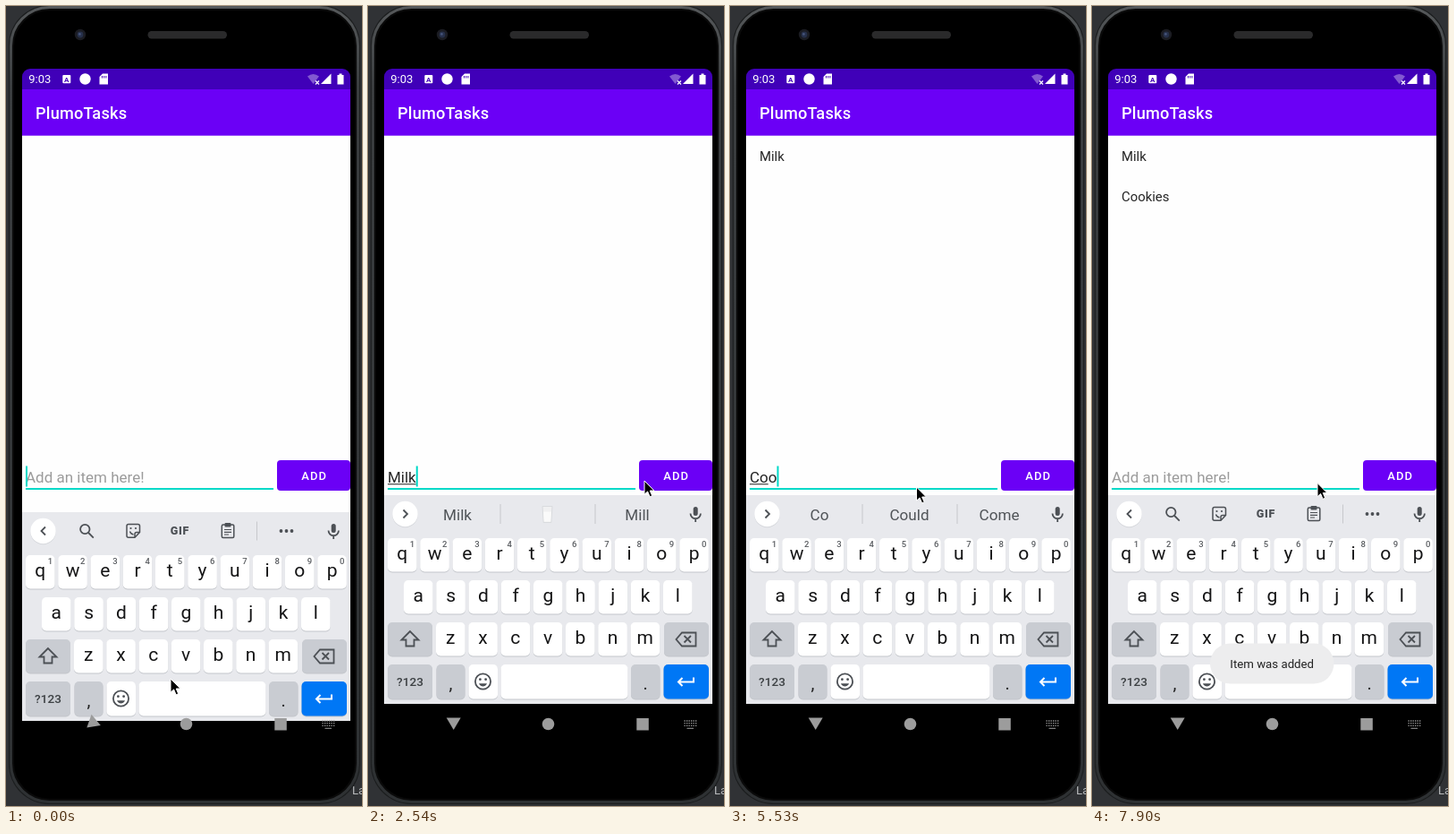
Recreate the animation shown at these times as an HTML page. Size 398 px wide and 893 px high, loop 8 s.

```html
<!DOCTYPE html>
<html lang="en">
<head>
<meta charset="utf-8">
<title>To-do list</title>
<style>
html, body { margin: 0; width: 100%; height: 100%; overflow: hidden; background: #303235; }
svg { display: block; width: 100vw; height: 100vh; }
text { font-family: Roboto, sans-serif; white-space: pre; }
.mid { text-anchor: middle; }
.med { font-weight: 500; }
.line { fill: none; stroke: #4c5055; stroke-width: 1.8; }
</style>
</head>
<body>
<svg id="stage" viewBox="0 0 398 893" preserveAspectRatio="none"></svg>
<script>
const LOOP = 8000;
const stage = document.getElementById('stage');

const rect = (x, y, w, h, fill, r = 0, more = '') =>
  `<rect x="${x}" y="${y}" width="${w}" height="${h}" rx="${r}" fill="${fill}" ${more}/>`;
const circle = (x, y, r, fill, more = '') =>
  `<circle cx="${x}" cy="${y}" r="${r}" fill="${fill}" ${more}/>`;
const path = (d, more = 'class="line"') => `<path d="${d}" ${more}/>`;
const text = (x, y, size, fill, str, more = '') =>
  `<text x="${x}" y="${y}" font-size="${size}" fill="${fill}" ${more}>${str}</text>`;

function phone() {
  return '<linearGradient id="rim" x2="0" y2="1"><stop stop-color="#55585a"/>' +
    '<stop offset=".1" stop-color="#3a3d3f"/><stop offset="1" stop-color="#2e3133"/></linearGradient>' +
    rect(0, 0, 398, 893, '#303235') +
    text(387, 880, 13, '#b9bbbd', 'La') +
    rect(3, -1, 393, 892, '#1b1d1e', 45) +
    rect(5.5, 1.5, 388, 887, '#0a0a0a', 43, 'stroke="url(#rim)" stroke-width="3"') +
    rect(9, 5, 381, 880, '#000', 40) +
    rect(158.5, 28, 88.5, 8.5, '#2a2a2b', 4.2) +
    circle(83, 32, 6.2, '#1b1c22') + circle(83, 32, 3.4, '#26304a') + circle(82.4, 31.4, 1.3, '#47557c');
}

function statusBar() {
  return path('M18 93V79a9 9 0 0 1 9-9H376a9 9 0 0 1 9 9V93Z', 'fill="#4000b8"') +
    rect(18, 93, 367, 51.7, '#6b00f6') +
    text(25.3, 86.3, 13, '#fff', '9:03') +
    rect(63.3, 77, 9, 9.3, '#fff', 1) + text(67.8, 84.7, 8, '#4000b8', 'A', 'class="mid" font-weight="700"') +
    circle(88.5, 81.5, 6.2, '#fff') +
    path('M108 75.5H114V87.5H104.5V79Z', 'fill="#fff"') +
    path('M107.5 78v2.5M109.7 78v2.5M111.9 78v2.5', 'stroke="#4000b8"') +
    path('M337 78.5Q343.5 73.5 350 78.5L343.5 87Z', 'fill="#fff" opacity=".35"') +
    path('M346 83.5l4 4m0-4l-4 4', 'stroke="#fff" stroke-width="1.2"') +
    path('M363.5 75.5V87H352Z', 'fill="#fff"') +
    path('M372.5 75.5h3v1.5h2v10.5h-7V77h2Z', 'fill="#fff"') +
    text(33, 126, 18.2, '#fff', 'PlumoTasks', 'class="med" letter-spacing=".2"');
}

function key(x, y, w, label = '', fill = '#fff', h = 37.5) {
  return rect(x, y + 1, w, h, '#c3c6cb', 5) + rect(x, y, w, h, fill, 5) +
    (label && text(x + w / 2, y + 24, 21, '#151516', label, 'class="mid"'));
}

function keyRow(letters, x, y) {
  return [...letters].map((c, i) => key(x + i * 36.25, y, 32.6, c)).join('');
}

function keyboard() {
  const gray = '#c9ccd2';
  const digits = [...'1234567890'].map((d, i) =>
    text(49.5 + i * 36.25, 603.5, 9.5, '#5a5d61', d, 'class="mid med"')).join('');
  return rect(18, 546, 367, 233, '#e8e9ed') +
    circle(41.5, 568, 14.2, '#d5d7db') + circle(41.5, 567, 14.2, '#fff') +
    '<path id="chev" class="line"/>' +
    `<g id="tools">${toolbar()}</g><g id="sugs">${suggestions()}</g>` +
    rect(363.7, 559, 5, 10, '#4c5055', 2.5) + path('M360.5 566.5a5.7 5.7 0 0 0 11.4 0M366.2 572v4') +
    keyRow('qwertyuiop', 22, 594) + digits +
    keyRow('asdfghjkl', 40, 641) + keyRow('zxcvbnm', 76, 688) +
    key(22, 688, 50, '', gray) + path('M47 698l-9.5 9.5h5v7h9v-7h5Z') +
    key(331, 688, 50, '', gray) +
    path('M351 699.5H366.5V714.5H351L344.5 707Z M353.5 703l7.5 7.5m0-7.5l-7.5 7.5') +
    key(22, 735, 50, '', gray, 38.5) + text(47, 759, 13.6, '#3c4043', '?123', 'class="mid med"') +
    key(76.5, 735, 32, '', gray, 38.5) + text(92.5, 762.5, 20, '#222', ',', 'class="mid"') +
    key(112.5, 735, 32.5, '', '#fff', 38.5) +
    circle(128.5, 754, 8.6, 'none', 'class="line"') + circle(125.4, 751.7, 1.4, '#4c5055') +
    circle(131.6, 751.7, 1.4, '#4c5055') + path('M124 756.3a4.8 4.8 0 0 0 9 0Z', 'fill="#4c5055"') +
    key(148.5, 735, 142, '', '#fff', 38.5) +
    key(294, 735, 32.5, '', gray, 38.5) + text(310.2, 762.5, 20, '#222', '.', 'class="mid"') +
    key(330.5, 735, 50.5, '', '#0077f5', 38.5) +
    path('M364 749.5V754.5H347.5M351.5 750l-4.5 4.5 4.5 4.5', 'fill="none" stroke="#fff" stroke-width="2"');
}

function toolbar() {
  const c = '#4c5055';
  return circle(88.3, 565, 5.2, 'none', 'class="line"') + path('M92.2 569l5.6 5.6') +
    path('M137 559.5h10.5q2 0 2 2v7l-5.5 5.8h-7q-2 0-2-2v-10.8q0-2 2-2ZM149 568.5h-3q-2 0-2 2v3.5',
      'class="line" style="stroke-width:1.5"') +
    path('M138.5 567.5q1 3 4 3.5', 'class="line" style="stroke-width:1.4"') +
    circle(139.5, 564, 1.1, c) + circle(145, 564, 1.1, c) +
    text(194.5, 571.3, 12.5, c, 'GIF', 'class="mid" font-weight="900" letter-spacing=".8"') +
    rect(241.3, 560, 13.5, 14.5, 'none', 1.5, 'class="line" style="stroke-width:1.5"') +
    rect(244.5, 558, 7, 4.5, c, 1) +
    path('M244 565.5h8M244 568.3h8M244 571h5', 'class="line" style="stroke-width:1.2"') +
    rect(280, 556.5, 1, 21, '#c6c8cc') +
    [307.5, 313.5, 319.5].map(x => circle(x, 567, 1.9, c)).join('');
}

function suggestions() {
  return rect(147.5, 556, 1, 22, '#c6c8cc') + rect(253.5, 556, 1, 22, '#c6c8cc') +
    [100, 200.5, 301].map(x => text(x, 573.7, 17.1, '#505458', '', 'class="mid sug"')).join('') +
    '<g id="glass">' + path('M195 558.5h11l-1.2 18h-8.6Z', 'fill="#f0f0f1" stroke="#d9dbde"') +
    path('M196 564.5h9l-.8 11h-7.4Z', 'fill="#fafafa"') + '</g>';
}

function navBar() {
  const g = '#9c9c9c';
  return path('M-8 -6.5H8L0 7Z', `id="back" fill="${g}"`) +
    circle(201.5, 801.5, 6.8, g) + rect(300.3, 795, 13.5, 13.5, g) +
    path('M353.5 798h14M353.5 800.7h14M353.5 803.4h14', `stroke="${g}" stroke-width="1.3" stroke-dasharray="1.3 1.2"`) +
    path('M356.5 806.3h7.5', `stroke="${g}" stroke-width="1"`);
}

stage.innerHTML = phone() + rect(18, 140, 367, 639, '#fefefe') + statusBar() +
  text(33, 173, 14.9, '#262626', 'Milk', 'id="item1"') +
  text(33, 217.6, 14.9, '#262626', 'Cookies', 'id="item2"') +
  text(22, 531.6, 17, '#9b9b9b', 'Add an item here!', 'id="hint"') +
  text(22, 531.6, 17, '#262626', '', 'id="typed"') +
  rect(22, 533.2, 0, 1.1, '#333', 0, 'id="under"') +
  rect(22, 538, 277, 2, '#00d9c8') +
  rect(22, 513.5, 2, 23, '#00d9c8', 0, 'id="caret"') +
  rect(303, 507, 82, 34, '#6b00f6', 4, 'id="add"') +
  text(344.7, 529, 13, '#fff', 'ADD', 'class="mid med" letter-spacing="1.15"') +
  `<g id="board">${keyboard()}</g>` + navBar() +
  '<g id="toast">' + rect(132, 711.5, 138.5, 45, '#ededee', 22.5) +
  text(201.2, 739, 13.25, '#222', 'Item was added', 'class="mid"') + '</g>' +
  path('M0 0V15.2L3.6 11.9L6.1 17.8L8.7 16.7L6.2 11H10.9Z',
    'id="mouse" fill="#000" stroke="#fff" stroke-width="1" stroke-linejoin="round"');

const el = id => document.getElementById(id);
const slots = [...document.querySelectorAll('.sug')];

// Each entry holds from its time until the next one.
const hold = (list, t) => list.reduce((cur, e) => (e[0] <= t ? e : cur), list[0]);

// time, typed text, underlined letters, suggestions (empty: toolbar)
const typing = [
  [0, '', 0, ''],
  [450, 'M', 0, ''],
  [600, 'M', 1, 'M,My,Me'],
  [900, 'Mi', 1, 'M,My,Me'],
  [1050, 'Mil', 2, 'Mi,Miss,Minute'],
  [1200, 'Milk', 3, 'Mil,Milk,Miles'],
  [1500, 'Milk', 4, 'Milk,*,Mill'],
  [3140, '', 0, ''],
  [4040, 'C', 0, ''],
  [4190, 'C', 1, 'C,Can,Call'],
  [5380, 'Co', 1, 'C,Can,Call'],
  [5530, 'Coo', 2, 'Co,Could,Come'],
  [5680, 'Cook', 3, 'Coo,Cool,Cook'],
  [5830, 'Cooki', 4, 'Cook,Cooking,Cookies'],
  [5980, 'Cookie', 5, 'Cooki,Cookie,Cookies'],
  [6120, 'Cookies', 6, 'Cookie,Cookies,Cooked'],
  [6270, 'Cookies', 7, 'Cookies,Coolies,'],
  [7460, '', 0, '']
];
const mouse = [
  [0, 184, 751], [1950, 190, 741], [2100, 212, 702], [2250, 248, 638], [2400, 284, 574],
  [2540, 309, 530], [2690, 320, 511], [2840, 323.5, 504.5],
  [3290, 302, 514], [3440, 246, 530], [3590, 208.5, 537],
  [6570, 230.5, 534.5], [6720, 258, 529], [6870, 290, 522], [7020, 314, 516], [7170, 325, 514],
  [7750, 292, 523], [7900, 252, 532.5]
];
const blink = [[0, 1], [1950, 0], [2400, 1], [2990, 0], [3140, 1], [3590, 0], [4040, 1],
  [4630, 0], [5080, 1], [7020, 0], [7460, 1], [7900, 0]];
const press = [[0, 0], [2990, 1], [3290, 0], [7320, 1], [7610, 0]];
const toast = [[0, 0], [3140, .22], [3290, .65], [3440, .9], [3590, 1],
  [4930, .7], [5080, .35], [5230, 0], [7460, .22], [7610, .65], [7750, .9], [7900, 1]];
const slide = [[0, 19, 50], [150, 4, 12], [300, 0, 0]];

const show = (node, on) => node.setAttribute('visibility', on ? 'inherit' : 'hidden');

function draw(t) {
  const [, str, marked, sugs] = hold(typing, t);
  const typed = el('typed');
  typed.textContent = str;
  const width = n => (n ? typed.getSubStringLength(0, n) : 0);
  el('under').setAttribute('width', width(marked));
  el('caret').setAttribute('x', 22 + width(str.length));
  show(el('caret'), hold(blink, t)[1]);
  show(el('hint'), !str);

  const words = sugs.split(',');
  slots.forEach((s, i) => { s.textContent = (words[i] || '').replace('*', ''); });
  show(el('tools'), !sugs);
  show(el('sugs'), sugs);
  show(el('glass'), sugs && words[1] === '*');
  el('chev').setAttribute('d', sugs ? 'M39.5 562.5l4.5 4.5-4.5 4.5' : 'M44 562.5l-4.5 4.5 4.5 4.5');

  show(el('item1'), t >= 3140);
  show(el('item2'), t >= 7460);
  el('add').setAttribute('fill', hold(press, t)[1] ? '#780af8' : '#6b00f6');
  el('toast').setAttribute('opacity', hold(toast, t)[1]);

  const [, drop, turn] = hold(slide, t);
  el('board').setAttribute('transform', `translate(0 ${drop})`);
  el('back').setAttribute('transform', `translate(95.7 801) rotate(${turn})`);
  const [, x, y] = hold(mouse, t);
  el('mouse').setAttribute('transform', `translate(${x} ${y})`);
}

const start = performance.now();
function tick() {
  draw((performance.now() - start) % LOOP);
  requestAnimationFrame(tick);
}
tick();
</script>
</body>
</html>
```
